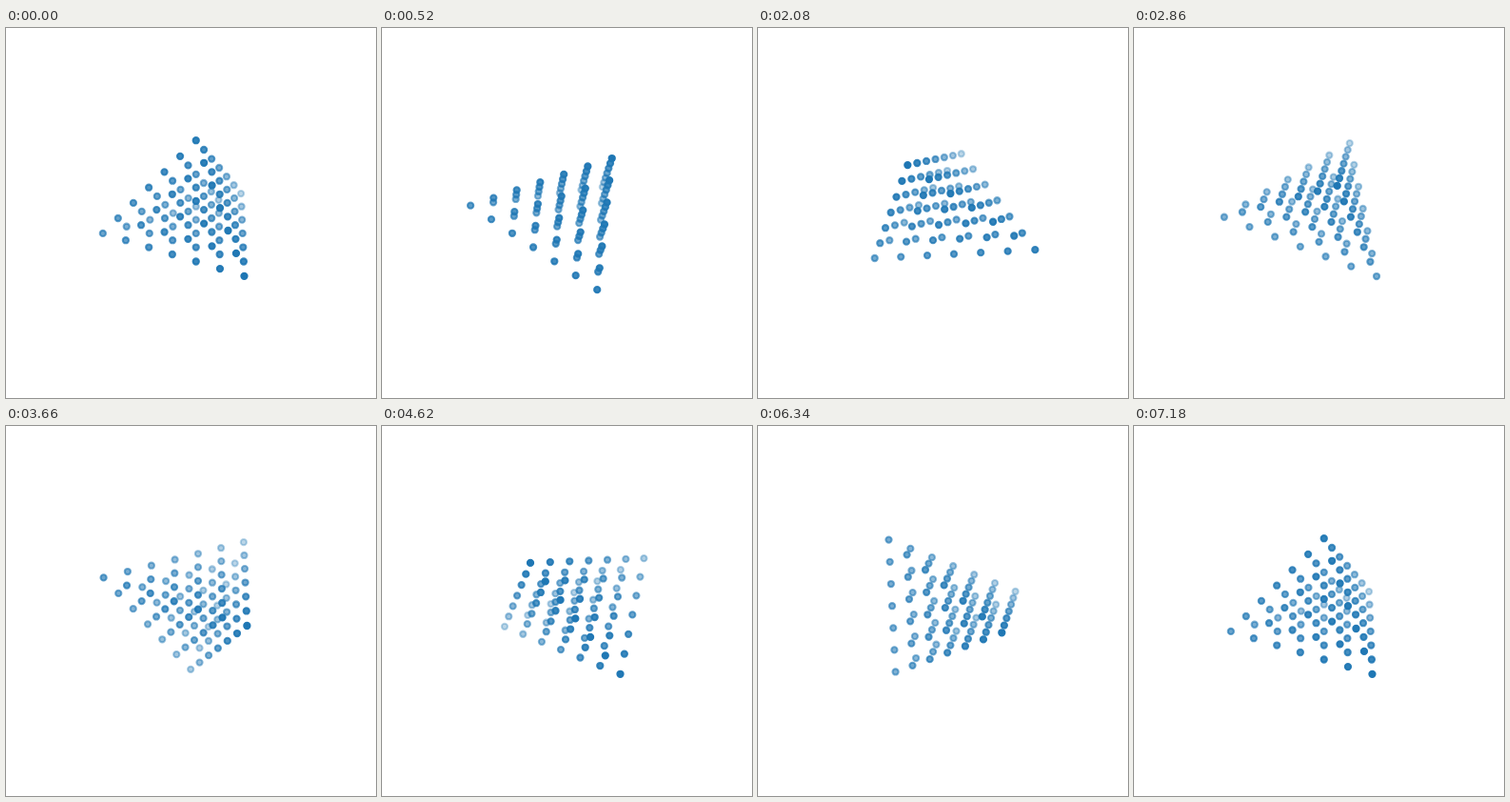
These frames come from a looping animation (389 px wide and 389 px high, 7200 ms). An HTML page with a canvas:

```html
<!DOCTYPE html>
<html lang="en">
<head>
<meta charset="utf-8">
<title>Rotating lattice</title>
<style>
  html, body { margin: 0; width: 100%; height: 100%; overflow: hidden; background: #fff; }
  canvas { display: block; width: 389px; height: 389px; }
</style>
</head>
<body>
<canvas id="stage" width="389" height="389"></canvas>
<script>
const ctx = document.getElementById('stage').getContext('2d');
const SIZE = 389, STEP_MS = 20, STEPS = 360;
const SPACING = 28.47, LAYER = 0.8705, FLOOR = -1.454, LAST = 6;
const CENTER_X = SIZE * 0.5135, CENTER_Y = SIZE * 0.4865;
const EYE = SIZE / 0.185;          // viewer distance in pixels
const Z_SCALE = 0.75;
const AZIM = -Math.PI / 3, ELEV = Math.PI / 6;
const DOT_R = 3.105, DOT_EDGE = 2.083;

// Triangular layers stacked into a tetrahedron
const points = [];
for (let k = 0; k <= LAST; k++) {
  const n = LAST - k;
  for (let j = 0; j <= n; j++) {
    for (let i = 0; i <= n - j; i++) {
      points.push({
        x: SPACING * (i + j / 2 - n / 2),
        y: SPACING * (j - n / 3) * Math.sqrt(3) / 2,
        z: SPACING * (FLOOR + LAYER * k)
      });
    }
  }
}

// Turn about the y axis, then view in perspective
function project(p, angle) {
  const cos = Math.cos(angle), sin = Math.sin(angle);
  const x = p.x * cos + p.z * sin;
  const z = (p.z * cos - p.x * sin) * Z_SCALE;
  const right = p.y * Math.cos(AZIM) - x * Math.sin(AZIM);
  const toward = x * Math.cos(AZIM) + p.y * Math.sin(AZIM);
  const up = z * Math.cos(ELEV) - toward * Math.sin(ELEV);
  const near = toward * Math.cos(ELEV) + z * Math.sin(ELEV);
  const scale = EYE / (EYE - near);
  return { x: CENTER_X + right * scale, y: CENTER_Y - up * scale, near };
}

function draw(step) {
  const angle = 2 * Math.PI * step / (STEPS - 1);
  const dots = points.map(p => project(p, angle)).sort((a, b) => a.near - b.near);
  const far = dots[0].near, range = dots[dots.length - 1].near - far;

  ctx.fillStyle = '#fff';
  ctx.fillRect(0, 0, SIZE, SIZE);
  ctx.lineWidth = DOT_EDGE;
  for (const d of dots) {
    const alpha = 0.3 + 0.7 * (d.near - far) / range;
    ctx.fillStyle = ctx.strokeStyle = `rgba(31, 119, 180, ${alpha})`;
    ctx.beginPath();
    ctx.arc(d.x, d.y, DOT_R, 0, 2 * Math.PI);
    ctx.fill();
    ctx.stroke();
  }
}

const start = performance.now();
function tick() {
  const time = Math.max(0, performance.now() - start);
  draw(Math.floor(time / STEP_MS) % STEPS);
  requestAnimationFrame(tick);
}
tick();
</script>
</body>
</html>
```
